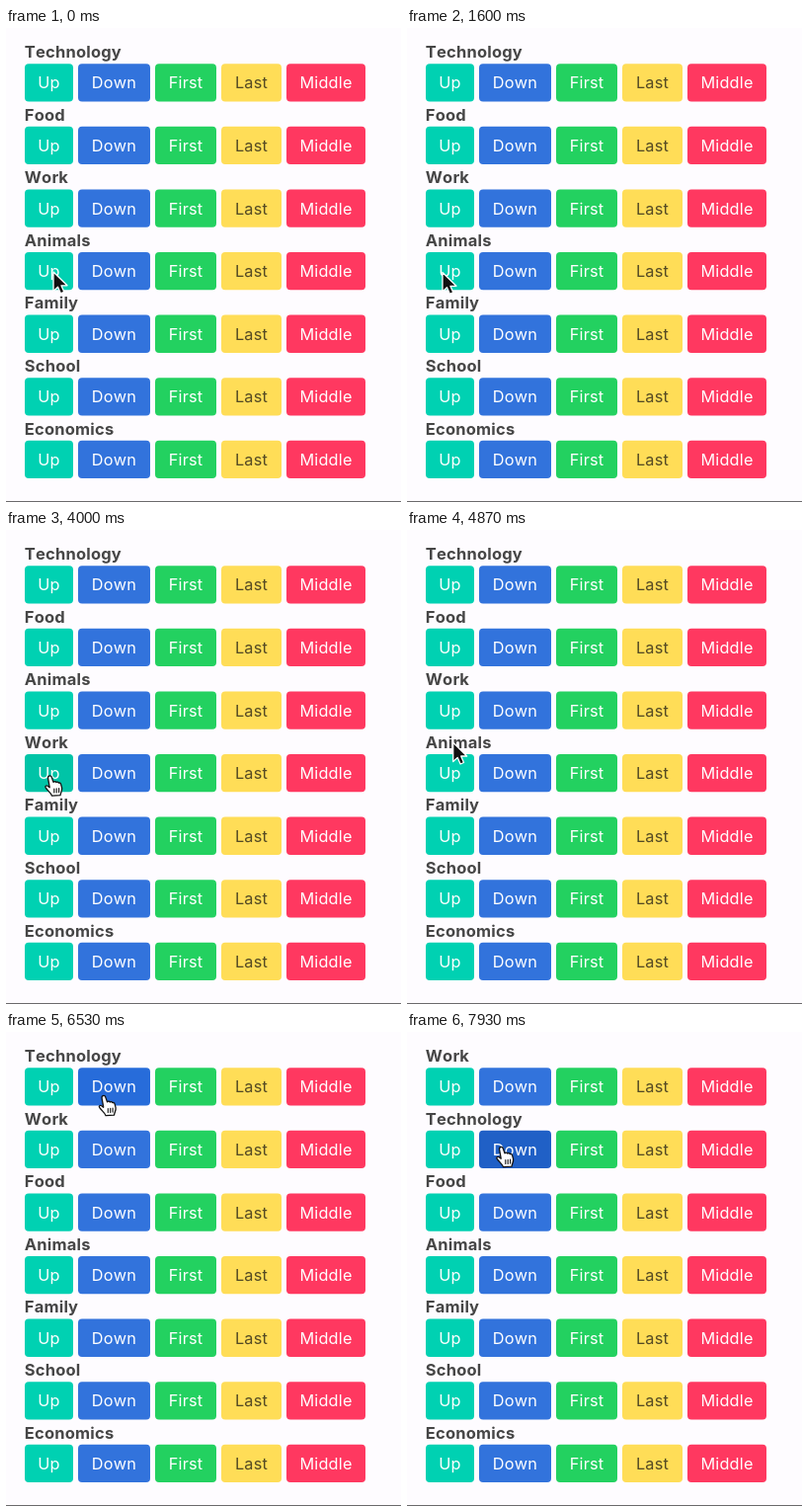
Write an HTML page that moves like this. It is 400 px wide and 480 px high and loops after 8 s.

```html
<!DOCTYPE html>
<html lang="en">
<head>
<meta charset="utf-8">
<title>Reorder list</title>
<style>
  html, body { margin: 0; width: 100%; height: 100%; overflow: hidden; background: #fefcff; }
  svg { display: block; width: 400px; height: 480px; cursor: default; }
  text { font-family: Inter, "Open Sans", sans-serif; font-kerning: none; }
  .label { font-size: 16.5px; font-weight: 700; letter-spacing: .2px; fill: #464646; }
  .caption { font-size: 16.3px; letter-spacing: .2px; text-anchor: middle; }
</style>
</head>
<body>
<svg viewBox="0 0 400 480">
  <rect width="400" height="480" fill="#fefcff"/>
  <g id="rows"></g>
  <rect y="479" width="400" height="1" fill="#6b6a6c"/>
  <g id="pointer" stroke-linejoin="round">
    <path id="arrow" d="M0 0V19.4L4.5 15.2 7.4 21.8 10.8 20.3 8 13.8H14Z" fill="#111" stroke="#fff" stroke-width="1.3"/>
    <g id="hand" transform="translate(-6 -1.3)" stroke="#111" stroke-linecap="round">
      <path fill="#fff" stroke-width="1.3" d="M5 .8C6.3 .4 7 1.2 7.4 2.6L9 7.2c.6-1 2.2-1 2.7.2.8-.8 2.2-.5 2.5.6 1-.5 2.2 0 2.4 1.2L17.6 13C18 16 16.5 17 16 20.5L7.5 21C7 18.5 3.5 16 1.3 13 0 11.2 1.8 10 3.3 11L5.2 12.5 3.6 3.4C3.3 2 3.8 1.1 5 .8Z"/>
      <path fill="none" stroke-width="1.1" d="M9.8 13.8V17.8M12.2 13.6V17.7M14.6 13.4V17.4"/>
    </g>
  </g>
</svg>
<script>
const LOOP = 8000, MOVE = 450, PRESS = 140;
const LEFT = 19, TOP = 36.2, PITCH = 63.6, HEIGHT = 38.3, GAP = 5;
const topics = ['Technology', 'Food', 'Work', 'Animals', 'Family', 'School', 'Economics'];
const buttons = [
  { text: 'Up', w: 49, fill: '#00d1b2', hover: '#00c4a7', press: '#00b89c', shift: -1 },
  { text: 'Down', w: 73, fill: '#3273dc', hover: '#276cda', press: '#2060c6', shift: 1 },
  { text: 'First', w: 62, fill: '#23d160' },
  { text: 'Last', w: 61, fill: '#ffdd57', ink: '#544a24' },
  { text: 'Middle', w: 80, fill: '#ff3860' }
];
buttons.reduce((x, b) => (b.x = x) + b.w + GAP, LEFT);

// The pointer reaches each stop at `at`; a click there is released at `click`.
const stops = [
  { at: 0, x: 48, y: 247 },
  { at: 1900, x: 2, y: 249 },
  { at: 2300, x: 48.5, y: 249, click: 2530 },
  { at: 3850, x: 45, y: 249.5, click: 4600 },
  { at: 5100, x: 48.5, y: 179, click: 5400 },
  { at: 6400, x: 99.5, y: 65, click: 7330 },
  { at: 7800, x: 96, y: 117, click: LOOP }
];
const focusTime = stops[1].at;

const $ = id => document.getElementById(id);
const rowTop = row => TOP + row * PITCH;

function add(tag, attrs, text = '') {
  const node = document.createElementNS('http://www.w3.org/2000/svg', tag);
  for (const key in attrs) node.setAttribute(key, attrs[key]);
  node.textContent = text;
  return $('rows').appendChild(node);
}

const labels = [], boxes = [];
topics.forEach((topic, row) => {
  const y = rowTop(row);
  labels.push(add('text', { class: 'label', x: LEFT - .2, y: y - 6.2 }, topic));
  boxes.push(buttons.map(b => {
    const box = add('rect', { x: b.x, y, width: b.w, height: HEIGHT, rx: 4 });
    add('text', { class: 'caption', x: b.x + b.w / 2, y: y + 25.1, fill: b.ink || '#fff' }, b.text);
    return box;
  }));
});

function hitTest({ x, y }) {
  const row = Math.floor((y - TOP) / PITCH);
  const col = buttons.findIndex(b => x >= b.x && x <= b.x + b.w);
  return col >= 0 && row >= 0 && y <= rowTop(row) + HEIGHT ? { row, col } : null;
}

function pointerAt(t) {
  let { x, y } = stops[0];
  for (const stop of stops) {
    const k = Math.min(1, Math.max(0, 1 - (stop.at - t) / MOVE));
    const ease = k * k * (3 - 2 * k);
    x += (stop.x - x) * ease;
    y += (stop.y - y) * ease;
  }
  return { x, y };
}

function orderAt(t) {
  const order = [...topics];
  for (const stop of stops) {
    if (!(t >= stop.click)) continue;
    const { row, col } = hitTest(stop);
    const other = row + buttons[col].shift;
    [order[row], order[other]] = [order[other], order[row]];
  }
  return order;
}

function draw(t) {
  orderAt(t).forEach((topic, row) => {
    if (labels[row].textContent !== topic) labels[row].textContent = topic;
  });

  const pointer = pointerAt(t);
  const hit = t > focusTime ? hitTest(pointer) : null;
  const state = stops.some(s => t >= s.click - PRESS && t < s.click) ? 'press' : 'hover';
  boxes.forEach((line, row) => line.forEach((box, col) => {
    const over = hit && hit.row === row && hit.col === col;
    box.setAttribute('fill', over && buttons[col][state] || buttons[col].fill);
  }));

  $('pointer').setAttribute('transform', `translate(${pointer.x} ${pointer.y})`);
  $('hand').style.display = hit ? '' : 'none';
  $('arrow').style.display = hit ? 'none' : '';
}

const start = performance.now();
function tick() {
  draw((performance.now() - start) % LOOP);
  requestAnimationFrame(tick);
}
tick();
</script>
</body>
</html>
```
